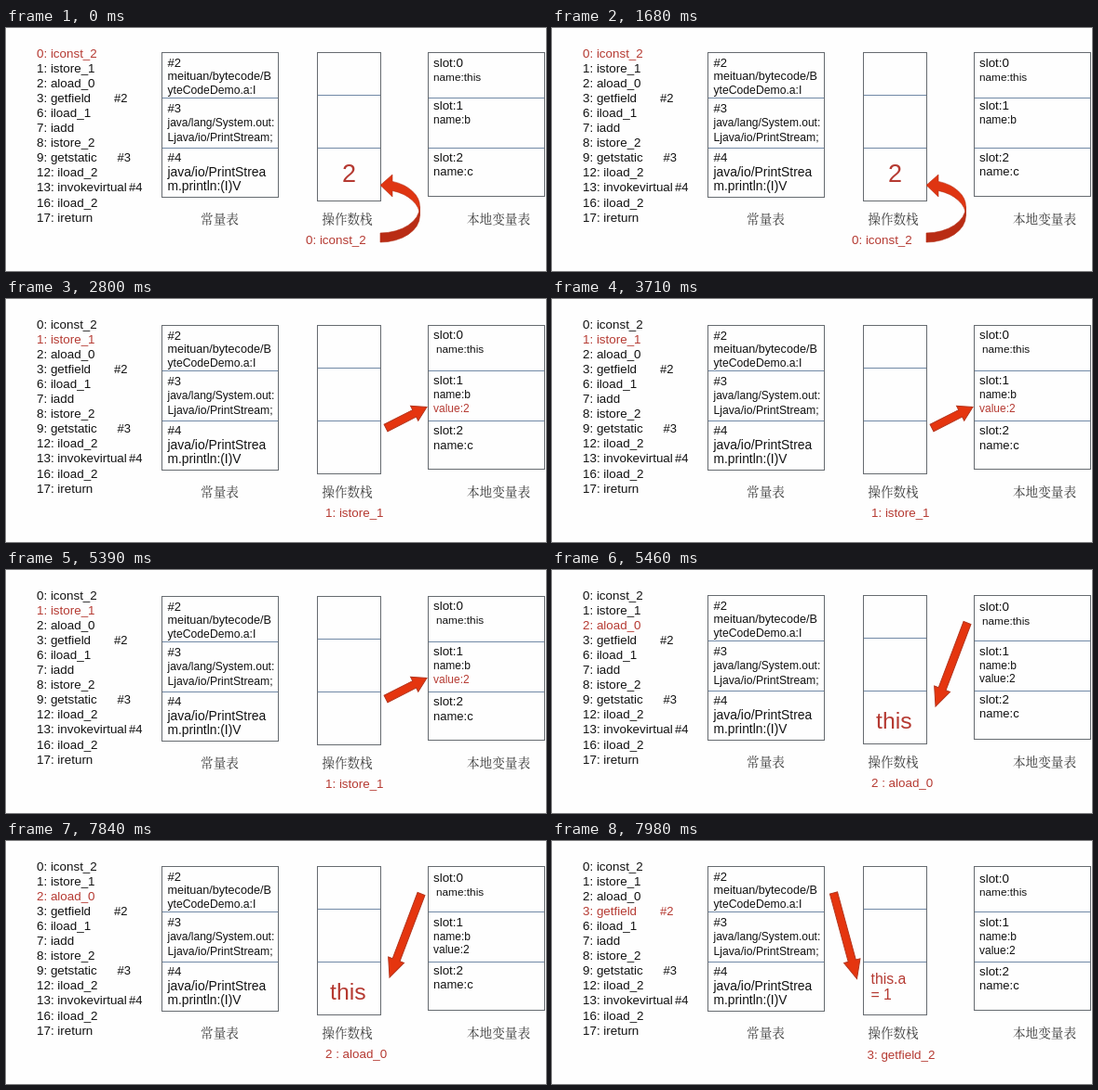
These frames come from a looping animation (580 px wide and 262 px high, 8000 ms). An HTML page:

```html
<!DOCTYPE html>
<html lang="zh">
<head>
<meta charset="utf-8">
<title>Bytecode steps</title>
<style>
html, body { margin: 0; width: 100%; height: 100%; overflow: hidden; background: #fefefe; }
svg { display: block; width: 580px; height: 262px; }
text { font-family: "Liberation Sans", Arial, sans-serif; white-space: pre; }
.caption { font-family: "Noto Serif CJK SC", "Songti SC", "Noto Sans CJK SC", "Noto Sans CJK", serif; font-weight: 300; }
</style>
</head>
<body>
<svg id="stage" viewBox="0 0 580 262"></svg>
<script>
const LOOP = 8000;
const INK = '#111', RED = '#b53a32', ARROW = '#e5350f', EDGE = '#b5351d';
const OUTER = '#666b70', INNER = '#7189a6';
const stage = document.getElementById('stage');

const code = [
  '0: iconst_2', '1: istore_1', '2: aload_0', '3: getfield', '6: iload_1', '7: iadd',
  '8: istore_2', '9: getstatic', '12: iload_2', '13: invokevirtual', '16: iload_2', '17: ireturn'
];
// row: [operand, x]
const operands = { 3: ['#2', 116], 7: ['#3', 119.5], 9: ['#4', 132] };

// text, baseline, size
const constants = [
  ['#2', 42, 13], ['meituan/bytecode/B', 56.3, 12.6], ['yteCodeDemo.a:I', 71.3, 12.2],
  ['#3', 90.5, 13], ['java/lang/System.out:', 106.2, 12], ['Ljava/io/PrintStream;', 121.5, 12.2],
  ['#4', 143.5, 13.4], ['java/io/PrintStrea', 159.5, 13.9], ['m.println:(I)V', 175, 13.8]
];

const steps = [
  { start: 0, dy: 0, row: 0, label: ['0: iconst_2', 322, 233],
    slots: [41.5, 88, 143.5], name: [459, 57], value: null,
    stack: [['2', 361, 165.5, 27]], arrow: curvedArrow },
  { start: 2800, dy: 2, row: 1, label: ['1: istore_1', 343, 235],
    slots: [43, 92, 146], name: [462, 58], value: RED,
    stack: [], arrow: () => blockArrow(408, 139, 452, 116.5, 15) },
  { start: 5460, dy: 1, row: 2, label: ['2 : aload_0', 343, 234],
    slots: [43.5, 91.5, 143.5], name: [462, 58.5], value: INK,
    stack: [['this', 348, 171, 24.8]], arrow: () => blockArrow(446, 57, 412, 147, 20) },
  { start: 7910, dy: 1, row: 3, label: ['3: getfield_2', 338.5, 235],
    slots: [44.5, 92, 144.5], name: [459, 58.7], value: INK,
    stack: [['this.a', 342.5, 153.5, 15.8], ['= 1', 342.5, 170.7, 15.8]],
    arrow: () => blockArrow(302.5, 56, 327.5, 148.5, 20) }
];

function text(str, x, y, size = 13.4, fill = INK, extra = '') {
  return `<text x="${x}" y="${y}" font-size="${size}" fill="${fill}" ${extra}>${str}</text>`;
}

function table(x, y, w, h, lines) {
  const rules = lines.map(l => `M${x} ${y + l}h${w}`).join('');
  return `<path d="${rules}" stroke="${INNER}" fill="none"/>` +
    `<rect x="${x}" y="${y}" width="${w}" height="${h}" stroke="${OUTER}" fill="none"/>`;
}

function blockArrow(x1, y1, x2, y2, head) {
  const len = Math.hypot(x2 - x1, y2 - y1);
  const angle = Math.atan2(y2 - y1, x2 - x1) * 180 / Math.PI;
  const neck = len - head;
  return `<path transform="translate(${x1} ${y1}) rotate(${angle})" fill="${ARROW}" stroke="${EDGE}"
    d="M0 -4.2H${neck}V-9L${len} 0L${neck} 9V4.2H0Z"/>`;
}

function curvedArrow() {
  return `<g stroke="${EDGE}" stroke-width=".6">` +
    `<path fill="#b92c14" d="M402 231A42.5 28.5 0 0 0 444.5 202.5V192.5A42.5 28.5 0 0 1 402 221Z"/>` +
    `<path fill="#df3512" d="M415 165.4A42.5 28.5 0 0 1 444.5 192.5V202.5A42.5 28.5 0 0 0 415 175.4V182L402 169.5L415 158Z"/></g>`;
}

function listing(active) {
  return code.map((line, i) => {
    const y = 31.5 + 16.1 * i, fill = i === active ? RED : INK;
    const op = operands[i];
    return text(line, 33, y, 13.4, fill) + (op ? text(op[0], op[1], y, 13, fill) : '');
  }).join('');
}

function locals(s) {
  const [a, b, c] = s.slots;
  return text('slot:0', 459, a) + text('name:this', ...s.name, 11.8) +
    text('slot:1', 459, b) + text('name:b', 459, b + 15.3, 12) +
    (s.value ? text('value:2', 459, b + 29.5, 12, s.value) : '') +
    text('slot:2', 459, c) + text('name:c', 459, c + 15.5, 13);
}

function scene(s) {
  const y = 26.5 + s.dy;
  const captions = [['常量表', 229.5], ['操作数栈', 366.5], ['本地变量表', 529]];
  return listing(s.row) +
    table(167.5, y, 125, 156, [49, 103]) +
    table(334.5, y, 68, 160, [46, 103]) +
    table(453.5, y, 125, 155, [49, 103]) +
    constants.map(([str, base, size]) => text(str, 173.5, base + s.dy, size)).join('') +
    locals(s) +
    captions.map(([str, x]) =>
      text(str, x, 211 + s.dy, 13.6, '#3a3a3a', 'class="caption" text-anchor="middle"')).join('') +
    s.stack.map(([str, x, base, size]) => text(str, x, base, size, RED)).join('') +
    text(...s.label, 13.4, RED) + s.arrow();
}

let shown = null;
function render(t) {
  const step = steps.filter(s => s.start <= t).pop();
  if (step === shown) return;
  shown = step;
  stage.innerHTML = scene(step);
}

const begin = performance.now();
function tick() {
  render(Math.max(0, performance.now() - begin) % LOOP);
  requestAnimationFrame(tick);
}
tick();
</script>
</body>
</html>
```
